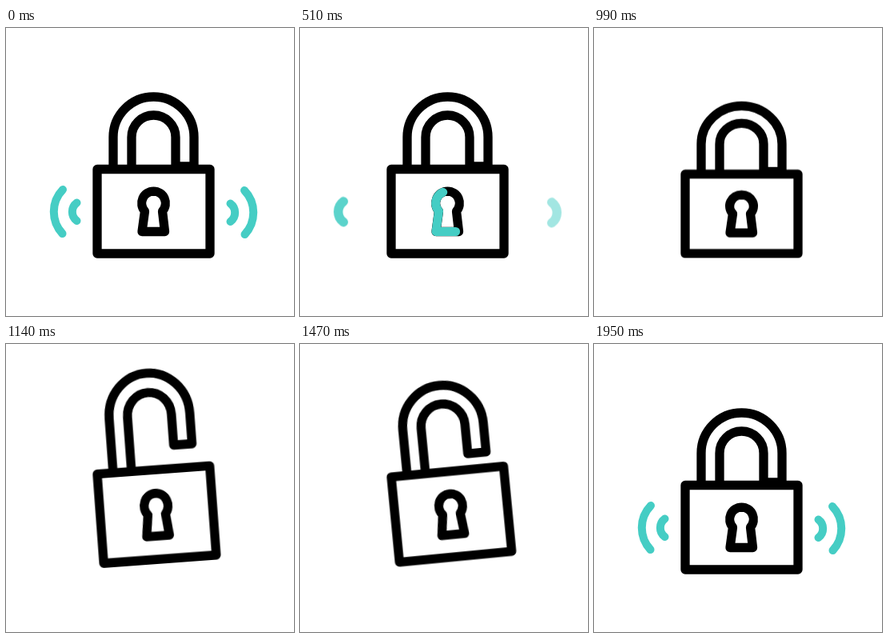
An HTML page without scripts that plays this animation: 360x360 px, repeating every 1980 ms.

```html
<!DOCTYPE html>
<html lang="en">
<head>
<meta charset="utf-8">
<title>Padlock</title>
<style>
  html, body { margin: 0; width: 100%; height: 100%; overflow: hidden; background: #fff; }
  svg { display: block; width: 100vw; height: 100vh; }
  path, rect { fill: none; stroke: #000; stroke-width: 11; stroke-linecap: round; stroke-linejoin: round; }
  .ink { stroke-width: 11.3; vector-effect: non-scaling-stroke; }
  .body { fill: #fff; }
  .wave path, .trace { stroke: #45cdc4; }
  .wave path { stroke-width: 10; }

  .lock, .shackle, .wave, .near, .far, .trace {
    animation: 1980ms linear infinite;
  }
  .lock { transform-origin: 184.5px 282px; animation-name: pose; }
  .shackle { animation-name: lift; }
  .wave { transform-origin: 100px 230px; animation-name: grow; }
  .near { transform-origin: 83px 230px; animation-name: near; }
  .far { transform-origin: 60px 230px; animation-name: far; }
  .trace { animation-name: trace; }
  .left { --dim: .88; }
  .right { --dim: .5; }

  /* squash, jump and tilt, then settle */
  @keyframes pose {
    0%, 41% { transform: translate(0, 0) rotate(0deg) scaleY(1); animation-timing-function: ease-in-out; }
    50%, 52.3% { transform: translate(0, 0) rotate(0deg) scaleY(.942); }
    54.55% { transform: translate(4px, -6px) rotate(-2.2deg) scaleY(1.03); }
    57.58% { transform: translate(8px, -13px) rotate(-4.2deg) scaleY(1.06); }
    60.6% { transform: translate(9px, -14.5px) rotate(-4.8deg) scaleY(1.055); }
    66.67% { transform: translate(10px, -16px) rotate(-5.4deg) scaleY(1.025); }
    74.24%, 76% { transform: translate(10px, -16px) rotate(-5.5deg) scaleY(1.015); }
    81.82% { transform: translate(5.3px, -8px) rotate(-3deg) scaleY(1); }
    87.88% { transform: translate(3.5px, -4.5px) rotate(-2deg) scaleY(1); }
    98.48%, 100% { transform: translate(0, 0) rotate(0deg) scaleY(1); }
  }
  @keyframes lift {
    0%, 52.3% { transform: translateY(0); }
    54.55% { transform: translateY(-17px); }
    57.58% { transform: translateY(-24px); }
    60.6% { transform: translateY(-25px); }
    66.67% { transform: translateY(-19px); }
    74.24%, 76% { transform: translateY(-16px); }
    81.82% { transform: translateY(-6px); }
    87.88% { transform: translateY(-5.5px); }
    98.48%, 100% { transform: translateY(0); }
  }

  /* ripples run outward, later regrow beside the body */
  @keyframes grow {
    0%, 30.2% { transform: scale(1); opacity: 1; }
    33.3% { transform: scale(1); opacity: 0; }
    33.4%, 77.3% { transform: scale(.5); opacity: 0; }
    81.82% { transform: scale(.82); opacity: 1; }
    87.88% { transform: scale(.85); opacity: 1; }
    98.48%, 100% { transform: scale(1); opacity: 1; }
  }
  @keyframes near {
    0%, 1.5% { transform: translateX(0) scale(1); opacity: 1; }
    18% { opacity: 1; }
    25.76%, 40% { transform: translateX(-35px) scale(1.15); opacity: var(--dim); }
    40.1%, 100% { transform: translateX(0) scale(1); opacity: 1; }
  }
  @keyframes far {
    0%, 1.5% { transform: translateX(0); opacity: 1; }
    8% { opacity: .9; }
    15%, 40% { transform: translateX(-18px); opacity: 0; }
    40.1%, 100% { transform: translateX(0); opacity: 1; }
  }

  /* coloured stroke running round the keyhole */
  @keyframes trace {
    0%, 1.5% { stroke-dasharray: 0 101; stroke-dashoffset: 0; opacity: 0; }
    1.6% { stroke-dasharray: 0 101; stroke-dashoffset: 0; opacity: 1; }
    23.5% { stroke-dasharray: 52 101; stroke-dashoffset: 0; }
    25.76%, 30.2% { stroke-dasharray: 53 101; stroke-dashoffset: -4; }
    39% { stroke-dasharray: 45 101; stroke-dashoffset: -55; }
    47% { stroke-dasharray: 0 101; stroke-dashoffset: -100; opacity: 1; }
    47.1%, 100% { stroke-dasharray: 0 101; stroke-dashoffset: -100; opacity: 0; }
  }
</style>
</head>
<body>
<svg viewBox="0 0 360 360">
  <g class="lock">
    <g class="wave left">
      <path class="far" d="M71 202A40 40 0 0 0 70.5 257"/>
      <path class="near" d="M88.5 218.5A14 14 0 0 0 88.5 241"/>
    </g>
    <g transform="translate(369 1) scale(-1 1)">
      <g class="wave right">
        <path class="far" d="M71 202A40 40 0 0 0 70.5 257"/>
        <path class="near" d="M88.5 218.5A14 14 0 0 0 88.5 241"/>
      </g>
    </g>
    <g class="shackle">
      <path class="ink" d="M134 212V136.5A50.5 50.5 0 0 1 235 136.5V173H212V136.5A27.5 27.5 0 0 0 157 136.5V212"/>
    </g>
    <rect class="ink body" x="114" y="176.5" width="141" height="105.5"/>
    <path class="ink" d="M184.5 204.1A14.9 14.9 0 0 0 173.5 229L170 254.5H198.5L195.5 229A14.9 14.9 0 0 0 184.5 204.1Z"/>
    <path class="trace" pathLength="100" d="M184.5 204.1A14.9 14.9 0 0 0 173.5 229L170 254.5H198.5L195.5 229A14.9 14.9 0 0 0 184.5 204.1"/>
  </g>
</svg>
</body>
</html>
```
